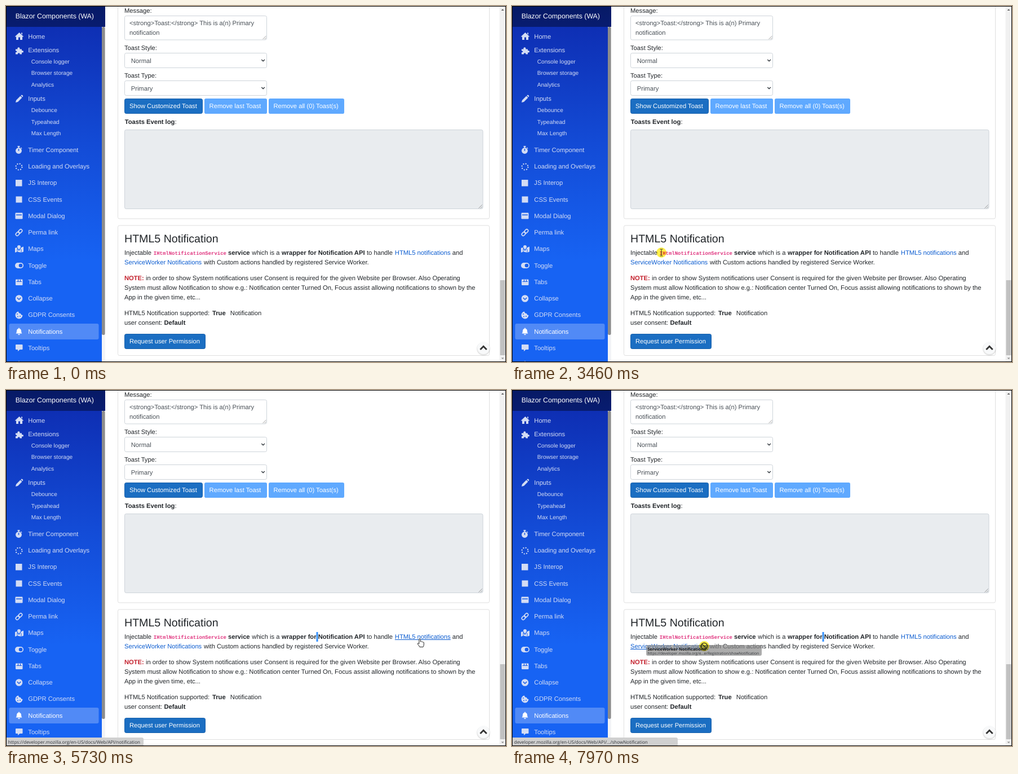
Recreate the animation shown at these times as an HTML page. Size 887x631 px, loop 8000 ms.

```html
<!DOCTYPE html>
<html lang="en">
<head>
<meta charset="utf-8">
<title>Blazor Components</title>
<style>
html, body { margin: 0; width: 100%; height: 100%; overflow: hidden; background: #fff; }
svg { display: block; width: 887px; height: 631px; }
text { font: 11.2px "Liberation Sans", Arial, sans-serif; fill: #212529; text-rendering: geometricPrecision; }
.b { font-weight: 700; }
.run { fill: var(--sel, #212529); }
.code { font: 700 8.98px "Liberation Mono", monospace; fill: var(--sel, #e0357f); }
.link { fill: var(--sel, #0b5cd0); }
.note { fill: #c4232f; }
.h { font-size: 19.6px; }
.brand { font-size: 12.32px; fill: #fff; }
.field { fill: #495057; }
.white, .white text { fill: #fff; }
.nav { fill: #d3dcf4; }
.sub { font-size: 10.08px; fill: #d3dcf4; }
.tiny { font: 8.06px "Open Sans", "Noto Sans", sans-serif; fill: #33363a; }
.box { fill: #fff; stroke: #ced4da; stroke-width: 1; }
.card { fill: none; stroke: #dfdfdf; stroke-width: 1; }
.primary { fill: #1b6ec2; stroke: #1861ac; stroke-width: 1; }
.off { fill: #5fa9ff; }
.icons { fill: #d3dcf4; stroke: none; }
.ln { fill: none; stroke: #d3dcf4; stroke-width: 1.6; stroke-linecap: round; }
.cut { fill: none; stroke: #185ce4; stroke-width: 1.5; }
.caret { fill: none; stroke: #343a40; stroke-width: 1.4; }
.grip { stroke: #777; stroke-width: .7; }
.under { stroke: #0b5cd0; stroke-width: 1; }
#press { mix-blend-mode: multiply; }
</style>
</head>
<body>
<svg viewBox="0 0 887 631">
  <defs>
    <linearGradient id="side" x2="0" y2="1">
      <stop offset="0" stop-color="#0e2fb4"/>
      <stop offset=".35" stop-color="#134bd6"/>
      <stop offset=".7" stop-color="#1763f3"/>
      <stop offset="1" stop-color="#1763f3"/>
    </linearGradient>
    <linearGradient id="head" x2="0" y2="1">
      <stop offset="0" stop-color="#071a66"/>
      <stop offset="1" stop-color="#081c70"/>
    </linearGradient>
    <clipPath id="selClip"><rect id="clipBox" y="429" height="17"/></clipPath>
  </defs>
  <rect width="887" height="631" fill="#fff"/>

  <!-- sidebar -->
  <rect x="1" y="37" width="169" height="593" fill="url(#side)"/>
  <rect x="170" y="37" width="6" height="593" fill="#f3f4f6"/>
  <rect x="170" y="37" width="5.6" height="546" rx="2.5" fill="#8c8c8c"/>
  <rect x="1" y="1" width="175" height="36" fill="url(#head)"/>
  <text class="brand" x="16.8" y="22">Blazor Components (WA)</text>
  <rect x="5.500" y="563" width="159" height="28" rx="3" fill="#fff" fill-opacity=".25"/>
  <g id="nav"></g>
  <g class="icons">
    <path d="M16 54L23.500 47L31 54L30 55L29 54V60H25V55.500H22V60H18V54L17 55ZM27 47.500H29V51L27 49Z"/>
    <path d="M17 76.500H20.500C19 73 25 71.500 24.500 76.500H28V79C32 78 32 83.500 28 82.500V85.500H24.500C25 82.500 20.500 82.500 21 85.500H17V82C20 82.500 20 79 17 79.500Z"/>
    <path d="M17 171L18 167L25.500 159.500L28.500 162.500L21 170ZM26.300 158.700L27.500 157.700Q28.300 157.300 29 158L30 159Q30.600 159.800 30 160.500L29.200 161.500Z"/>
    <circle cx="22.500" cy="256.500" r="5.400"/><path d="M20.500 248H24.500V249.700H23.400V252H21.600V249.700H20.500ZM26.500 250.500L28.500 252.300L27.600 253.200L25.800 251.400Z"/>
    <path class="cut" d="M22.500 253V257"/>
    <circle cx="23" cy="285" r="5.500" fill="none" stroke="#d3dcf4" stroke-width="2" stroke-dasharray="2 2.320"/>
    <rect x="17" y="308" width="11.500" height="11.500"/>
    <rect x="17.500" y="337.500" width="11" height="11"/>
    <rect x="16.500" y="366.500" width="13" height="11" rx="1.200"/><path class="cut" d="M18 370.300H28"/>
    <g class="ln" transform="translate(23 401.500) rotate(-45)"><rect x="-7" y="-2.500" width="7.500" height="5" rx="2.500"/><rect x="-.5" y="-2.500" width="7.500" height="5" rx="2.500"/></g>
    <path d="M16 429L19 428Q20 431 23 434Q26 431 27 428L31 426.500V435.500L27 437L20 435.500L16 437ZM23 424a3 3 0 0 1 3 3q0 2-3 5q-3-3-3-5a3 3 0 0 1 3-3"/>
    <path class="cut" d="M20 430V436M27 431V437" style="stroke-width:.9"/>
    <rect x="16" y="455" width="15" height="10" rx="5"/><circle cx="26" cy="460" r="3.300" fill="#185fec"/>
    <rect x="17" y="484.500" width="12.500" height="10.500" rx="1.200"/><path class="cut" d="M18.500 488.500H28M21.500 485V488M25.500 485V488" style="stroke-width:1.200"/>
    <circle cx="23" cy="518.500" r="6.300"/><path class="cut" d="M19.700 517L23 520.300L26.300 517"/>
    <path d="M22 541.500Q22.500 545 26 545Q26.500 548 29.500 548A6.500 6.500 0 1 1 22 541.500"/>
    <g fill="#185fec"><circle cx="20" cy="546" r=".9"/><circle cx="21" cy="550.500" r=".9"/><circle cx="25" cy="550" r=".9"/></g>
    <path class="white" d="M22.300 570.500H23.700V571.700Q27 572.500 27 576Q27 579 28.500 580.500H17.500Q19 579 19 576Q19 572.500 22.300 571.700ZM21 581.500H25Q24.700 583.200 23 583.200Q21.300 583.200 21 581.500Z"/>
    <path d="M18 600H28.500Q29.500 600 29.500 601V608Q29.500 609 28.500 609H24.500L21 612V609H18Q17 609 17 608V601Q17 600 18 600Z"/>
    <path d="M22 630L23 629L24 630Z"/>
  </g>

  <!-- upper card -->
  <path class="card" d="M198.500 0V374.500Q198.500 377 201 377H855Q857.500 377 857.500 374.500V0"/>
  <text x="210" y="12">Message:</text>
  <rect class="box" x="210.500" y="17.500" width="252" height="42.500" rx="2.800"/>
  <text class="field" x="219" y="34">&lt;strong&gt;Toast:&lt;/strong&gt; This is a(n) Primary</text>
  <text class="field" x="219" y="51">notification</text>
  <path class="grip" d="M455.500 59L461.500 53M458.800 59L461.500 56.300"/>
  <text x="210" y="78">Toast Style:</text>
  <rect class="box" x="210.500" y="83.500" width="252" height="26" rx="2.800"/>
  <text class="field" x="221.700" y="101">Normal</text>
  <path class="caret" d="M453.300 95L456.100 97.800L458.900 95"/>
  <text x="210" y="127">Toast Type:</text>
  <rect class="box" x="210.500" y="132.500" width="252" height="26" rx="2.800"/>
  <text class="field" x="221.700" y="150">Primary</text>
  <path class="caret" d="M453.300 144L456.100 146.800L458.900 144"/>
  <rect class="primary" x="210.500" y="164.500" width="138" height="26" rx="2.800"/>
  <rect class="off" x="352" y="164" width="111" height="27" rx="2.800"/>
  <rect class="off" x="466" y="164" width="134" height="27" rx="2.800"/>
  <g class="white">
    <text x="219" y="181">Show Customized Toast</text>
    <text x="360.600" y="181">Remove last Toast</text>
    <text x="474.400" y="181">Remove all (0) Toast(s)</text>
  </g>
  <text x="210.700" y="209"><tspan class="b">Toasts Event log</tspan>:</text>
  <rect class="box" x="210.500" y="219.500" width="635.500" height="140" rx="2.800" style="fill:#e9ecef"/>
  <path class="grip" d="M838.500 358.500L844.700 352.300M841.900 358.500L844.700 355.700"/>

  <!-- lower card -->
  <rect class="card" x="198.500" y="389" width="659" height="230.500" rx="2.800"/>
  <text class="h" x="210" y="419">HTML5 Notification</text>
  <g id="anchor" fill="none" stroke="#3d4248" stroke-width="1.200" transform="translate(387 411.300) rotate(-45)">
    <rect x="-6.500" y="-2.300" width="7" height="4.600" rx="2.300"/><rect x="-.5" y="-2.300" width="7" height="4.600" rx="2.300"/>
  </g>
  <g id="intro"><text class="run" y="441"><tspan x="210">Injectable</tspan><tspan class="code" x="261.800">IHtmlNotificationService</tspan><tspan class="b" x="394">service</tspan><tspan x="436.300">which is a</tspan><tspan class="b" x="489">wrapper for Notification API</tspan><tspan x="640">to handle</tspan><tspan class="link" x="689.800">HTML5 notifications</tspan><tspan x="791.700">and</tspan></text></g>
  <rect id="selBox" y="429" height="17" fill="#3390ff"/>
  <use href="#intro" clip-path="url(#selClip)" style="--sel:#fff"/>
  <text y="458"><tspan class="link" x="210">ServiceWorker Notifications</tspan><tspan x="351">with Custom actions handled by registered Service Worker.</tspan></text>
  <path id="under1" class="under" d="M689.800 442.500H788.800"/>
  <path id="under2" class="under" d="M210 459.500H348"/>
  <text y="486"><tspan class="b note" x="210">NOTE:</tspan><tspan x="248">in order to show System notifications user Consent is required for the given Website per Browser. Also Operating</tspan></text>
  <text x="210" y="503">System must allow Notification to show e.g.: Notification center Turned On, Focus assist allowing notifications to shown by the</text>
  <text x="210" y="520">App in the given time, etc...</text>
  <text y="548"><tspan x="210">HTML5 Notification supported:</tspan><tspan class="b" x="366">True</tspan><tspan x="397.800">Notification</tspan></text>
  <text y="565"><tspan x="210">user consent:</tspan><tspan class="b" x="280.500">Default</tspan></text>
  <rect class="primary" x="210.500" y="581.500" width="143" height="26" rx="2.800"/>
  <text class="white" x="219" y="598">Request user Permission</text>

  <circle cx="847" cy="607.500" r="12" fill="#000" fill-opacity=".1"/>
  <circle cx="847" cy="606" r="11" fill="#f8f9fa"/>
  <path d="M841.300 609L847 603.300L852.700 609" fill="none" stroke="#333" stroke-width="2.800"/>

  <!-- page scrollbar -->
  <rect x="875.500" y="1" width="11" height="629" fill="#f1f1f1"/>
  <rect x="876.500" y="486" width="9" height="133" fill="#c1c1c1"/>
  <path d="M878.500 8L881 5.500L883.500 8Z" fill="#505050"/><path d="M878.500 623.500L881 626L883.500 623.500Z" fill="#8a8a8a"/>

  <g id="status">
    <path id="bar" fill="#d0d0d0"/>
    <text id="url" class="tiny" x="3.800" y="627"></text>
  </g>
  <rect x=".5" y=".5" width="886" height="630" fill="none" stroke="#000"/>

  <!-- pointer -->
  <g id="ghost">
    <rect width="205" height="19" rx="3" fill="#858585" fill-opacity=".68"/>
    <text class="tiny" x="2.500" y="10" style="font-size:7.4px;font-weight:700;fill:#222">ServiceWorker Notifications</text>
    <text class="tiny" x="2.500" y="17" style="font-size:6.6px">https://developer.mozilla.org/e...erRegistration/showNotification</text>
  </g>
  <circle id="press" r="9" fill="#fff04a"/>
  <g id="pointer">
    <path id="arrow" d="M0 0V12L2.800 9.400L4.600 13.500L6.400 12.700L4.600 8.800H8.400Z" fill="#fff" stroke="#000" stroke-width=".8"/>
    <path id="beam" d="M-2.500 -6H-.7L0 -5.500L.7 -6H2.500M0 -5.500V5.500M-2.500 6H-.7L0 5.500L.7 6H2.500" fill="none" stroke="#333" stroke-width="1"/>
    <path id="hand" d="M-1.200 .8Q0 -1 1.200 .8V5Q2.500 3.900 3.500 5.300Q4.800 4.500 5.600 5.900Q7 5.500 7.300 7V10Q7.200 12.500 6 14.500H-.2Q-1.200 12 -3.800 9.200Q-4 7.500 -2.500 7.800L-1.200 9Z" fill="#fff" stroke="#111" stroke-width=".9" stroke-linejoin="round"/>
    <g id="deny" fill="none" stroke="#222" stroke-width="1.200"><circle r="5.600"/><path d="M-3.900 -3.900L3.900 3.900"/></g>
  </g>
</svg>
<script>
const $ = id => document.getElementById(id);
const LOOP = 8000;

const nav = [
  ["Home", 58], ["Extensions", 82], ["-Console logger", 102], ["-Browser storage", 122],
  ["-Analytics", 143], ["Inputs", 168], ["-Debounce", 188], ["-Typeahead", 209], ["-Max Length", 229],
  ..."Timer Component|Loading and Overlays|JS Interop|CSS Events|Modal Dialog|Perma link|Maps|Toggle|Tabs|Collapse|GDPR Consents|Notifications|Tooltips"
    .split("|").map((name, i) => [name, Math.round(258.7 + 29.27 * i)])
];
for (const [name, y] of nav) {
  const sub = name[0] === "-";
  const el = document.createElementNS("http://www.w3.org/2000/svg", "text");
  el.setAttribute("class", sub ? "sub" : name === "Notifications" ? "white" : "nav");
  el.setAttribute("x", sub ? 44.8 : 39.3);
  el.setAttribute("y", y);
  el.textContent = sub ? name.slice(1) : name;
  $("nav").append(el);
}

// Moves of the pointer: start, end, number of steps
const moves = [[440, 1210, 11], [1280, 2050, 13], [2120, 2120, 1], [2370, 3150, 13], [3200, 3980, 12],
  [4230, 4700, 8], [4950, 5730, 12], [5850, 6240, 6], [6470, 7270, 13], [7320, 7970, 10]];

// Waypoints: time, x, y
const path = [[440, 476, 612], [700, 360, 520], [980, 215, 418], [1080, 191, 413], [1210, 213, 411],
  [1280, 214, 411], [1900, 379, 411], [2050, 379, 411], [2120, 386, 412], [2370, 410, 408],
  [2560, 502, 387], [2760, 400, 412], [2960, 214, 430], [3150, 265, 437], [3460, 265, 437],
  [3980, 407, 442], [4230, 414, 440], [4430, 446, 440], [4700, 555, 438], [4950, 553, 431],
  [5150, 553, 437], [5730, 734, 441], [5850, 734, 441], [5990, 726, 437], [6240, 733, 441],
  [6470, 715, 434], [6670, 470, 448], [6870, 240, 460], [7270, 241, 455], [7320, 241, 454], [7970, 341, 454]];

const shapes = [[0, ""], [440, "arrow"], [2830, "beam"], [5560, "hand"], [6450, "arrow"],
  [6530, "beam"], [6790, "hand"], [7450, "deny"]];

const links = [
  { url: "https://developer.mozilla.org/en-US/docs/Web/API/notification", width: 244 },
  { url: "developer.mozilla.org/en-US/docs/Web/API/.../showNotification", width: 294 }
];

const within = (t, a, b) => t >= a && t < b;
const show = (id, on) => $(id).style.display = on ? "" : "none";
const place = (id, x, y) => $(id).setAttribute("transform", `translate(${x} ${y})`);

function snap(t) {
  const move = moves.findLast(m => t >= m[0]);
  if (!move) return 0;
  const [a, b, n] = move;
  const d = (b - a) / (n - 1) || 1;
  return a + Math.floor((Math.min(t, b) - a) / d + 1e-6) * d;
}

function pointAt(t) {
  const i = path.findIndex(p => p[0] > t);
  if (i <= 0) return i ? path.at(-1).slice(1) : path[0].slice(1);
  const [t0, x0, y0] = path[i - 1], [t1, x1, y1] = path[i];
  const k = (t - t0) / (t1 - t0);
  return [x0 + (x1 - x0) * k, y0 + (y1 - y0) * k];
}

function selectText(from, to) {
  for (const id of ["selBox", "clipBox"]) {
    $(id).setAttribute("x", from);
    $(id).setAttribute("width", Math.max(0, to - from));
  }
}

function draw(now) {
  const t = snap(now % LOOP);
  const [x, y] = pointAt(t);
  const shape = shapes.findLast(s => t >= s[0])[1];
  place("pointer", x, y);
  place("press", x, y);
  for (const id of ["arrow", "beam", "hand", "deny"]) show(id, id === shape);
  show("press", within(t, 1280, 2100) || within(t, 3200, 4230) || within(t, 4950, 5090) || t >= 7320);

  show("anchor", within(t, 980, 2490) || within(t, 2720, 2830));
  if (within(t, 3460, 4950)) selectText(267, x - 2);
  else if (t >= 5015) selectText(550.5, 553.5);
  else selectText(0, 0);

  show("under1", within(t, 5560, 6450));
  show("under2", t >= 6790);
  show("status", t >= 5560);
  const link = links[t >= 6790 ? 1 : 0];
  $("url").textContent = link.url;
  $("bar").setAttribute("d", `M1 616H${link.width - 3}Q${link.width} 616 ${link.width} 619V630H1Z`);

  show("ghost", t >= 7450);
  place("ghost", x - 103, y - 2);
}

function tick() {
  draw(performance.now());
  requestAnimationFrame(tick);
}
tick();
</script>
</body>
</html>
```
